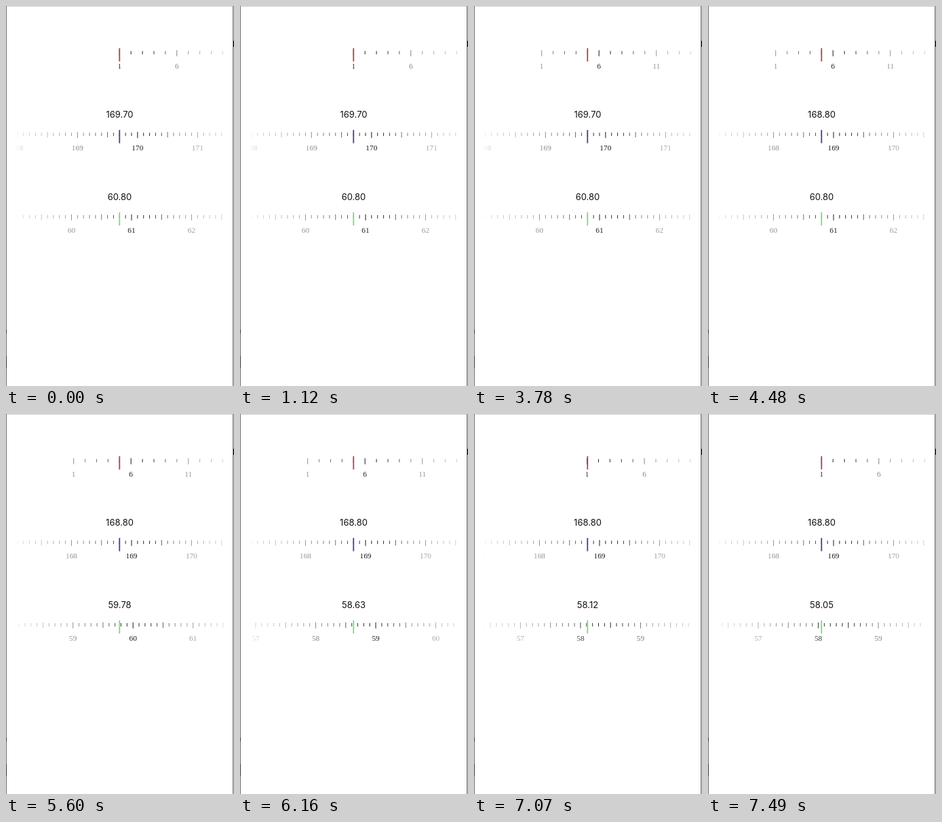
An HTML page for the animation above (7.56 s loop, 336 by 558 pixels).

```html
<!DOCTYPE html>
<html lang="en">
<head>
<meta charset="utf-8">
<title>Ruler pickers</title>
<style>
  html, body { margin: 0; width: 100%; height: 100%; overflow: hidden; background: #fff; }
  svg { position: absolute; left: 0; top: 0; display: block; }
  .scale {
    position: absolute; left: 0; width: 336px; height: 40px; overflow: hidden;
    -webkit-mask-image: var(--fade); mask-image: var(--fade);
    --fade: linear-gradient(90deg, transparent 13px, rgba(0,0,0,.17) 23px, rgba(0,0,0,.3) 60px,
      rgba(0,0,0,.48) 105px, rgba(0,0,0,.68) 148px, rgba(0,0,0,.85) 166px, #000 190px,
      rgba(0,0,0,.9) 215px, rgba(0,0,0,.52) 250px, rgba(0,0,0,.36) 284px,
      rgba(0,0,0,.2) 320px, transparent 321px);
  }
  .label { font: 11.3px "Liberation Serif", "Times New Roman", serif; fill: #111; text-anchor: middle; }
  .value { font: 13px Inter, "Liberation Sans", sans-serif; fill: #111; text-anchor: middle; }
</style>
</head>
<body>
<svg id="stage" width="336" height="558" viewBox="0 0 336 558">
  <rect width="336" height="1" fill="#d0d0d0"/>
  <rect width="1" height="558" fill="#6c6c6c"/>
  <rect x="334" width="1" height="558" fill="#6c6c6c"/>
  <rect x="335" width="1" height="558" fill="#c4c4c4"/>
  <rect x="335" y="51" width="1" height="9" fill="#111"/>
  <path d="M0 475h1v6h-1zM0 514h1v18h-1z" fill="#333"/>
</svg>
<script>
const LOOP = 7560, STEP = 70, CENTER = 167.3;
const NS = "http://www.w3.org/2000/svg";
const stage = document.getElementById("stage");

function add(parent, tag, attrs, text) {
  const el = document.createElementNS(NS, tag);
  for (const key in attrs) el.setAttribute(key, attrs[key]);
  if (text !== undefined) el.textContent = text;
  return parent.appendChild(el);
}

const progress = (t, from, to) => Math.min(1, Math.max(0, (t - from) / (to - from)));
const smooth = p => p * p * (3 - 2 * p);
const ease = (t, from, to) => smooth(progress(t, from, to));

// Drag, release, then exponential slowdown.
function fling(t) {
  const start = 5040, release = 5500, first = 60.8;
  const glide = s => 58 + 0.63 * Math.exp(-1.85 * (s - 6160) / 1000);
  if (t >= release) return glide(t);
  return first + (glide(release) - first) * Math.pow(progress(t, start, release), 2.6);
}

const rows = [
  { top: 60, min: 1, max: 30, step: 1, gap: 16.9, major: 5, color: "#b8423c",
    at: t => 1 + 4 * (ease(t, 2940, 3570) - ease(t, 6300, 7120)) },
  { top: 180, min: 166, max: 173, step: 0.1, gap: 8.85, major: 10, color: "#45418f", showValue: true,
    at: t => 169.7 - 0.9 * ease(t, 3850, 4480) },
  { top: 301, min: 55, max: 64, step: 0.1, gap: 8.85, major: 10, color: "#70e36d", showValue: true,
    at: fling }
];

function build(row) {
  const box = document.createElement("div");
  box.className = "scale";
  box.style.top = row.top + "px";
  document.body.insertBefore(box, stage);
  const svg = add(box, "svg", { width: 336, height: 40 });
  row.strip = add(svg, "g", {});
  const count = Math.round((row.max - row.min) / row.step);
  for (let i = 0; i <= count; i++) {
    const x = i * row.gap;
    const major = i % row.major === 0;
    const middle = row.major === 10 && i % 5 === 0;
    const y = major || middle ? 5 : 6;
    const height = major ? 8.8 : middle ? 8 : 5;
    add(row.strip, "rect", { x: x - 0.5, y, width: 1, height, fill: major ? "#111" : "#222" });
    if (major) {
      add(row.strip, "text", { class: "label", x, y: 32 }, Math.round(row.min + i * row.step));
    }
  }
  add(stage, "rect", { x: CENTER - 0.9, y: row.top + 2, width: 1.8, height: 19.5, fill: row.color });
  if (row.showValue) {
    row.value = add(stage, "text", { class: "value", x: 167.5, y: row.top - 15.7 });
  }
}

function draw(now) {
  const t = Math.floor((now % LOOP) / STEP) * STEP;
  for (const row of rows) {
    const v = row.at(t);
    const x = CENTER - (v - row.min) / row.step * row.gap;
    row.strip.setAttribute("transform", `translate(${x.toFixed(2)} 0)`);
    if (row.value) row.value.textContent = v.toFixed(2);
  }
}

rows.forEach(build);
const began = performance.now();
function tick() {
  draw(performance.now() - began);
  requestAnimationFrame(tick);
}
tick();
</script>
</body>
</html>
```
